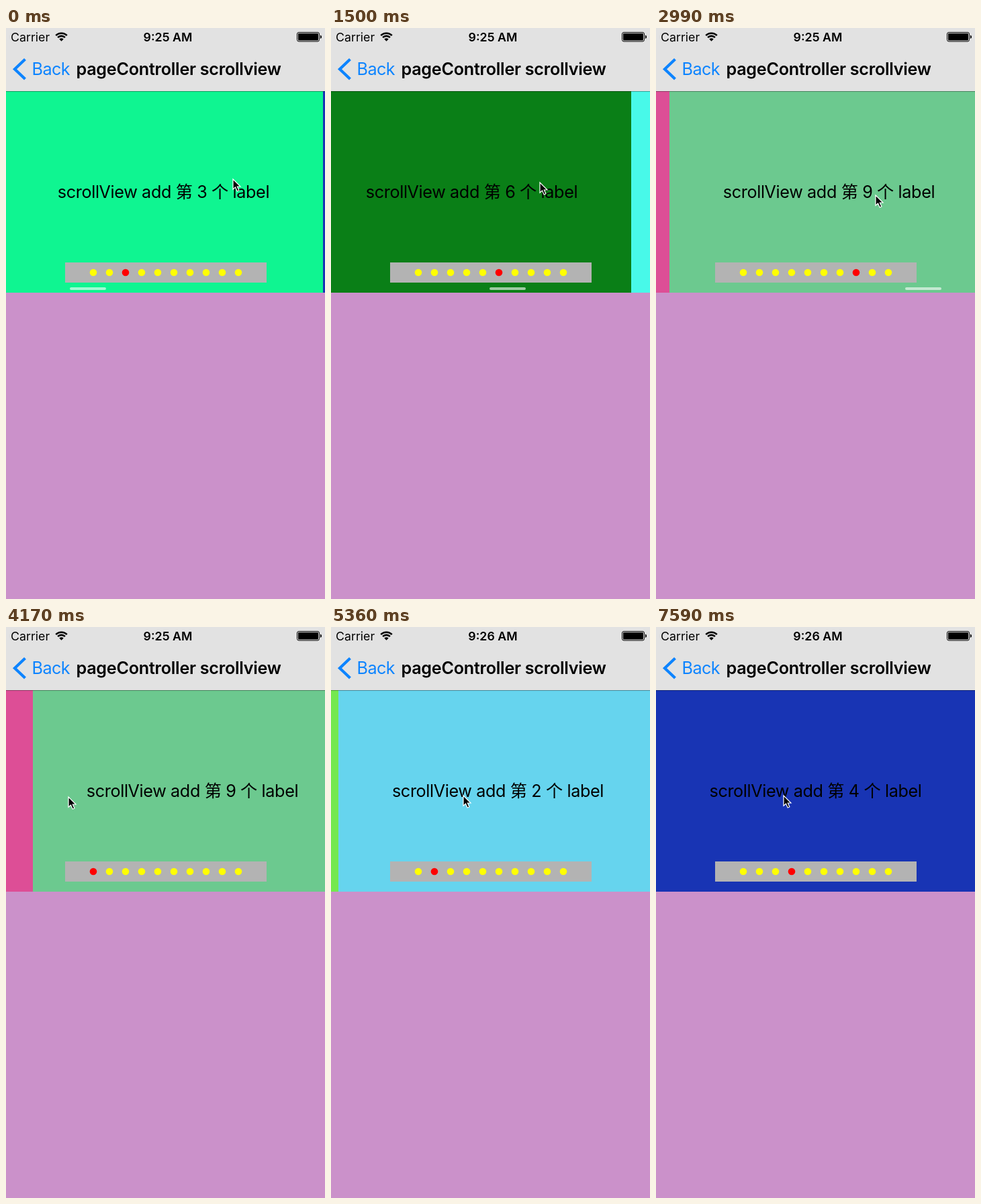
An HTML page for the animation above (8000 ms loop, 475 by 850 pixels).

```html
<!DOCTYPE html>
<html lang="en">
<head>
<meta charset="utf-8">
<title>pageController scrollview</title>
<style>
  html, body { margin: 0; width: 100%; height: 100%; overflow: hidden; background: #cb91ca; }
  svg { display: block; width: 475px; height: 850px; }
  text { font: 25.2px Inter, "Noto Sans CJK SC", "Noto Sans CJK", sans-serif; letter-spacing: -.38px; }
  .mid { text-anchor: middle; }
  .status { font-size: 17.8px; letter-spacing: 0; }
  .bold { font-weight: 600; }
  .title { letter-spacing: -.28px; }
  .back { letter-spacing: -.6px; }
</style>
</head>
<body>
<svg viewBox="0 0 475 850">
  <rect width="475" height="850" fill="#cb91ca"/>
  <g id="pages"></g>
  <rect id="thumb" y="386" width="54" height="4" rx="2" fill="#fff"/>
  <rect x="88" y="349" width="300" height="30" fill="#b3b3b3"/>
  <g id="dots"></g>

  <rect width="475" height="94" fill="#e2e2e2"/>
  <rect y="94" width="475" height="1" fill="#000" fill-opacity=".35"/>
  <text class="status" x="7" y="20">Carrier</text>
  <g fill="none" stroke="#000" stroke-width="2.6">
    <path d="M74.2 11.2a11.8 11.8 0 0 1 16.6 0M77.1 14.1a7.6 7.6 0 0 1 10.8 0"/>
    <path d="M82.5 19.8l-3.2-3.2a4.5 4.5 0 0 1 6.4 0z" fill="#000" stroke="none"/>
  </g>
  <text class="status bold mid" id="clock" x="241" y="20"></text>
  <rect x="433.5" y="6.5" width="33" height="13.5" rx="2.5" fill="none" stroke="#000"/>
  <rect x="435" y="8" width="30" height="10.5" rx="1" fill="#000"/>
  <path d="M468 10.5q2 .5 2 2.7t-2 2.7z"/>
  <path d="M28.5 46.5L13 61.2L28.5 76" fill="none" stroke="#0d84ff" stroke-width="4.2"/>
  <text class="back" x="38.5" y="70" fill="#0d84ff">Back</text>
  <text class="bold title" x="104.5" y="70">pageController scrollview</text>

  <path id="cursor" d="M0 0V15.2L3.5 12L6.2 18L8.9 16.8L6.3 11H11Z" fill="#000" stroke="#fff" stroke-width="1.2"/>
</svg>
<script>
const W = 475, LOOP = 8000;
const COLORS = ["#74e84f", "#66d4ee", "#0ff591", "#1834b4", "#e4640e",
                "#0a7f17", "#48f9e9", "#dd4e96", "#6cc98f", "#9b7fd0"];
const $ = id => document.getElementById(id);
const clamp = v => Math.min(1, Math.max(0, v));
const lerp = (a, b, u) => a + (b - a) * clamp(u);
const smooth = u => .5 - .5 * Math.cos(Math.PI * clamp(u));

function add(parent, tag, attrs, text = "") {
  const el = document.createElementNS("http://www.w3.org/2000/svg", tag);
  for (const k in attrs) el.setAttribute(k, attrs[k]);
  el.textContent = text;
  parent.append(el);
  return el;
}

const dots = COLORS.map((fill, i) => {
  add($("pages"), "rect", { x: i * W, y: 94, width: W, height: 300, fill });
  add($("pages"), "text", { x: i * W + W / 2, y: 253, class: "mid" },
      `scrollView add 第 ${i + 1} 个 label`);
  return add($("dots"), "circle", { cx: 130 + 24 * i, cy: 364, r: 5.3 });
});

const shortTicks = [11, 21, 26, 29, 40, 50];
const ticks = [0];
for (let n = 1; n < 54; n++) ticks.push(ticks[n - 1] + (shortTicks.includes(n) ? 140 : 150));

// Manual swipes, starting from page index 2.
const swipes = [-2, 690, 1090, 1480, 2040, 2604, 3130];
const FIRST = 2, DRAG = 210, SETTLE = 340, HOME = 341;
const reach = i => i === swipes.length - 1 ? 93 : 28;

// Automatic page turns: start time, from, to.
const turns = [[4102.3, 9, 0], [5089, 0, 1], [6080, 1, 2], [7085, 2, 3]];

// Pointer keys: time, value.
const yKeys = [[0, 225], [900, 221], [1940, 236], [2990, 249], [3400, 253], [4620, 253], [5060, 251]];
const xKeys = [[4620, 93], [5060, 197], [5600, 197], [5660, 196], [6800, 196],
               [6850, 192], [7540, 192], [7590, 190]];

function track(keys, t) {
  const i = keys.findIndex(k => k[0] > t);
  if (i < 0) return keys[keys.length - 1][1];
  if (!i) return keys[0][1];
  const [a, b] = [keys[i - 1], keys[i]];
  return lerp(a[1], b[1], (t - a[0]) / (b[0] - a[0]));
}

function swipePose(t) {
  const i = swipes.filter(s => s <= t).length - 1;
  const age = t - swipes[i], free = age - DRAG, end = reach(i);
  const dragX = lerp(HOME, end, age / DRAG);
  const pulled = (HOME - dragX) * .933 / W;
  const done = free >= SETTLE;
  const moved = done ? 1 : free > 0 ? 1 - (1 - pulled) * Math.exp(-free / 80) : pulled;
  const last = i === swipes.length - 1;
  return {
    offset: FIRST + i + moved,
    page: FIRST + i + (done ? 1 : 0),
    x: last ? dragX : lerp(dragX, HOME - 2, smooth((free - 10) / 190)),
    thumb: last ? 1 - clamp((t - 3640) / 200) : 1
  };
}

function turnPose(t) {
  const [start, from, to] = turns.filter(k => k[0] <= t).pop();
  return { offset: lerp(from, to, smooth((t - start) / 300)), page: to, x: track(xKeys, t), thumb: 0 };
}

function draw(now) {
  const time = now % LOOP;
  const t = ticks.filter(k => k <= time).pop();
  const pose = t < turns[0][0] ? swipePose(t) : turnPose(t);
  $("pages").setAttribute("transform", `translate(${-Math.round(pose.offset * W)} 0)`);
  $("thumb").setAttribute("x", Math.round(2.2 + 46.3 * pose.offset));
  $("thumb").setAttribute("opacity", .6 * pose.thumb);
  dots.forEach((d, i) => d.setAttribute("fill", i === pose.page ? "#f00" : "#ff0"));
  $("cursor").setAttribute("transform", `translate(${Math.round(pose.x)} ${Math.round(track(yKeys, t))})`);
  const clock = t < 5060 ? "9:25 AM" : "9:26 AM";
  if ($("clock").textContent !== clock) $("clock").textContent = clock;
}

const begin = performance.now();
function loop() {
  draw(performance.now() - begin);
  requestAnimationFrame(loop);
}
loop();
</script>
</body>
</html>
```
